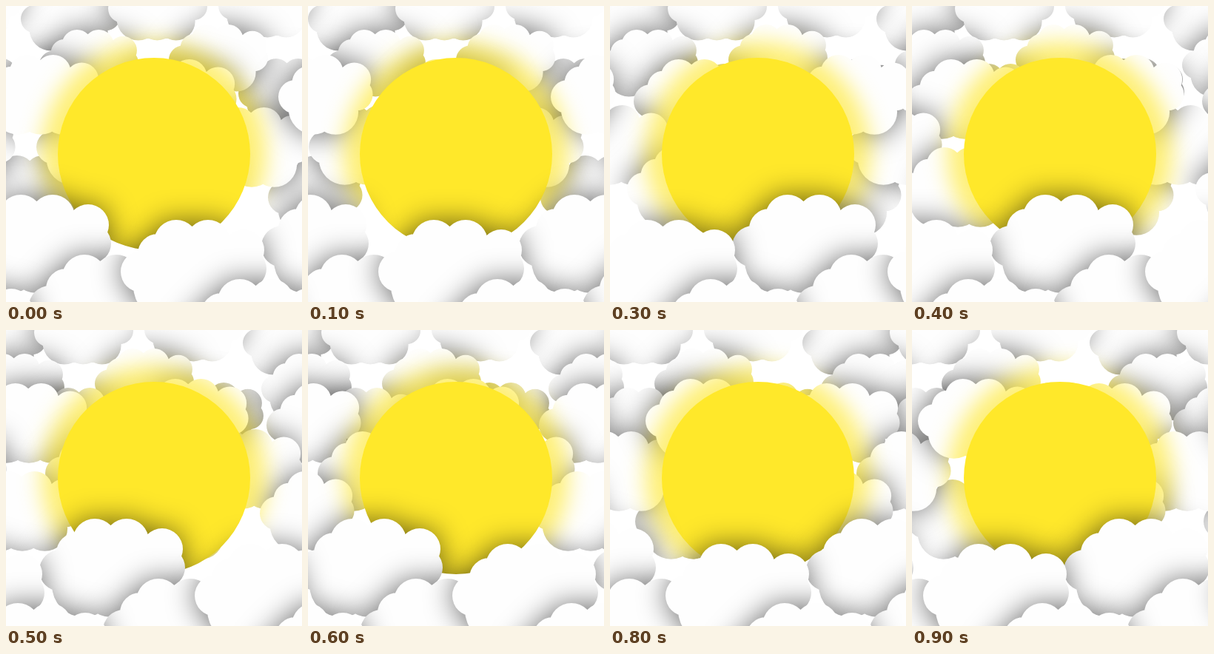
An HTML page with a canvas for the animation above (1000 ms loop, 400 by 400 pixels).

```html
<!DOCTYPE html>
<html lang="en">
<head>
<meta charset="utf-8">
<title>Sun and clouds</title>
<style>
html, body { margin: 0; width: 100%; height: 100%; overflow: hidden; background: #fff; }
canvas { display: block; width: 400px; height: 400px; }
</style>
</head>
<body>
<canvas id="sky" width="400" height="400"></canvas>
<script>
const SIZE = 400, LOOP = 1000, STEP = 100, PAD = 70, TAU = Math.PI * 2;
const ctx = document.getElementById('sky').getContext('2d');

const mod = (n, m) => ((n % m) + m) % m;

// n evenly spaced items between two points
function run(n, from, to) {
  return Array.from({ length: n }, (_, i) =>
    from.map((v, k) => v + (to[k] - v) * i / (n - 1)));
}

// A row of clouds stepping diagonally, painted from index `first` onwards
function chain(x, y, n = 1, dx = 0, dy = 0, first = 0) {
  return Array.from({ length: n }, (_, i) => {
    const k = (first + i) % n;
    return [x + dx * k, y + dy * k];
  });
}

// Runs of circles (x, y, radius) that make up every cloud
const puffs = [
  ...run(3, [28, 70, 28], [170, 66, 27]),
  ...run(4, [50, 46, 27], [166, 41, 28]),
  ...run(2, [75, 30, 30], [118, 30, 30]),
  ...run(3, [60, 90, 43], [135, 95, 38])
];

function disc(path, x, y, r) {
  path.moveTo(x + r, y);
  path.arc(x, y, r, 0, TAU);
  return path;
}

function blurred(path, w, h, color, blur) {
  const sprite = document.createElement('canvas');
  sprite.width = w + PAD * 2;
  sprite.height = h + PAD * 2;
  const c = sprite.getContext('2d');
  c.filter = `blur(${blur}px)`;
  c.translate(PAD, PAD);
  c.fillStyle = color;
  c.fill(path);
  return sprite;
}

// Speed is px per step
function cloudLayer(scale, speed, ...chains) {
  const path = new Path2D();
  for (const puff of puffs) disc(path, ...puff.map(v => v * scale));
  const shade = blurred(path, 200, 136, 'rgba(0,0,0,.58)', 19);
  return { path, shade, speed, color: '#fefefe', width: 197 * scale, spots: chains.flat() };
}

const sun = {
  path: disc(new Path2D(), 130, 130, 130),
  shade: blurred(disc(new Path2D(), 130, 130, 152), 260, 260, 'rgba(255,232,42,.65)', 15),
  speed: 0, color: '#ffe82a', width: 260, spots: [[70, 70]]
};

const layers = [
  cloudLayer(0.68, 20,
    chain(20, -30),
    chain(138, -44, 2, 149, -4),
    chain(220, 25, 2, 94, 46, 1),
    chain(45, 32, 2, 88, 46)),
  cloudLayer(0.81, 40,
    chain(152, 72, 3, 101, 65, 2),
    chain(41, 134),
    chain(368, 66, 2, 175, 125)),
  sun,
  cloudLayer(1, 60,
    chain(-55, 255, 2, 86, 81),
    chain(155, 289, 2, 86, 80))
];

// Shade falls only on what is already painted
function stamp(layer, x, y) {
  ctx.globalCompositeOperation = 'source-atop';
  ctx.drawImage(layer.shade, x - PAD, y - PAD);
  ctx.globalCompositeOperation = 'source-over';
  ctx.save();
  ctx.translate(x, y);
  ctx.fillStyle = layer.color;
  ctx.fill(layer.path);
  ctx.restore();
}

function draw(step) {
  ctx.clearRect(0, 0, SIZE, SIZE);
  for (const layer of layers) {
    for (const [left, top] of layer.spots) {
      const x = mod(left - layer.speed * step, SIZE);
      for (const px of [x - SIZE, x, x + SIZE]) {
        if (px + layer.width > -PAD && px < SIZE + PAD) stamp(layer, px, top);
      }
    }
  }
}

let shown = -1;
function tick() {
  const step = Math.floor((performance.now() % LOOP) / STEP);
  if (step !== shown) draw(shown = step);
  requestAnimationFrame(tick);
}
tick();
</script>
</body>
</html>
```
